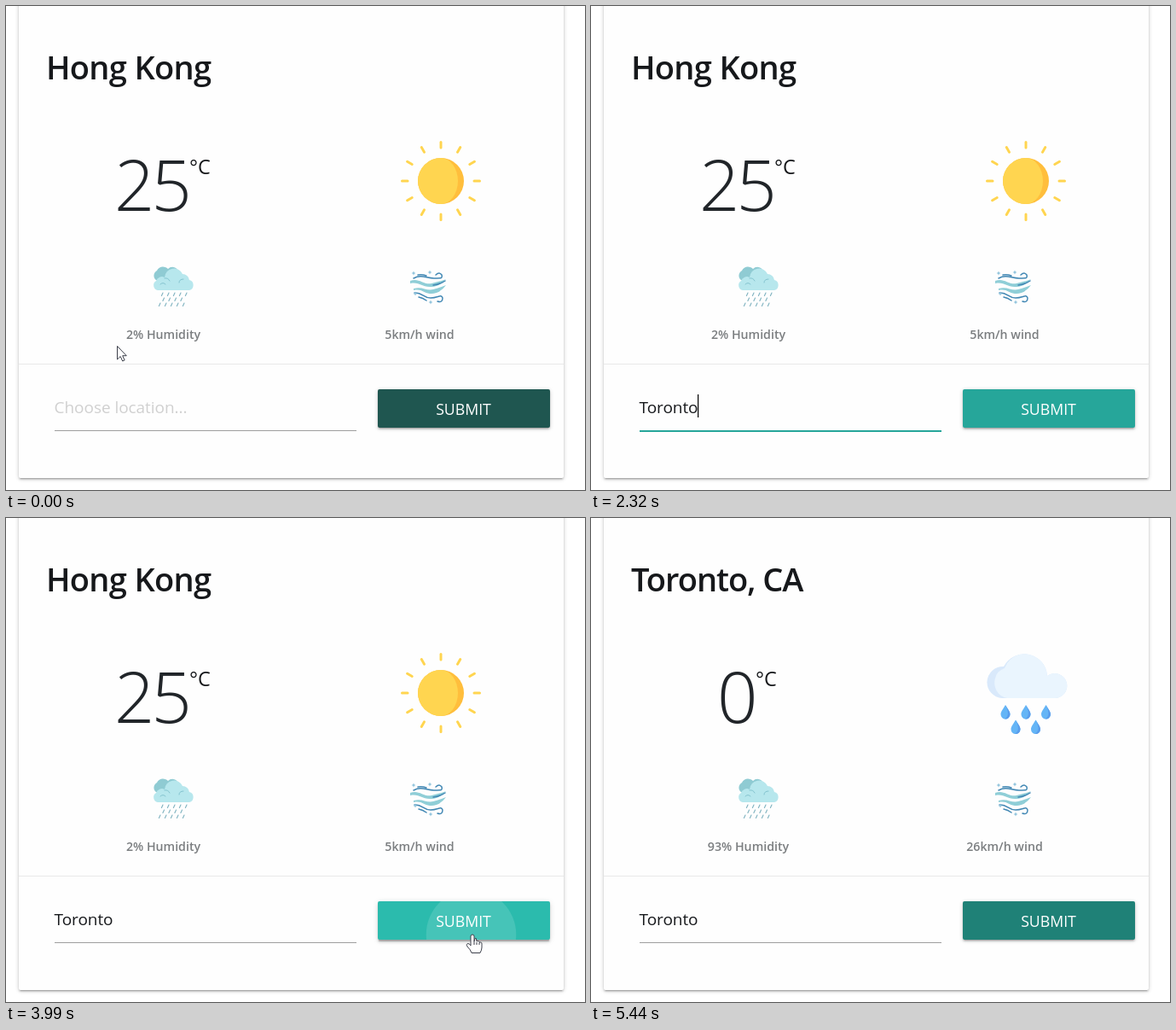
An HTML page for the animation above (5520 ms loop, 679 px wide and 567 px high).

```html
<!DOCTYPE html>
<html lang="en">
<head>
<meta charset="utf-8">
<title>Weather card</title>
<style>
  html, body { margin: 0; width: 100%; height: 100%; overflow: hidden; background: #fff; }
  div, svg { position: absolute; }
  #card { left: 15px; top: -20px; width: 639px; height: 573px; border-radius: 2px; background: #fefefe;
    box-shadow: 0 2px 2px rgba(0,0,0,.14), 0 3px 1px -2px rgba(0,0,0,.12), 0 1px 5px rgba(0,0,0,.2); }
  #button { left: 436px; top: 449px; width: 202px; height: 45px; border-radius: 2px; }
  svg { left: 0; top: 0; width: 679px; height: 567px; }
  text { font-family: "Open Sans", "Noto Sans", sans-serif; white-space: pre; }
  .title { font-size: 38px; font-weight: 560; fill: #16181b; }
  .temp { font-size: 83px; font-weight: 300; letter-spacing: -4px; fill: #212529; }
  .unit { font-size: 23.5px; font-weight: 500; fill: #16181b; }
  .label { font-size: 14.2px; font-weight: 600; fill: #7b7e80; text-anchor: middle; }
  .field { font-size: 19px; letter-spacing: -.05px; }
  .line { fill: none; stroke-linecap: round; stroke-linejoin: round; }
</style>
</head>
<body>
<div id="card"></div>
<div id="button"></div>
<svg viewBox="0 0 679 567">
  <defs>
    <clipPath id="buttonClip"><rect x="436" y="449" width="202" height="45" rx="2"/></clipPath>
    <clipPath id="cloudClip">
      <path d="M482 211A18.500 18.500 0 1 1 484 174A27 27 0 0 1 535 185A14.500 14.500 0 1 1 543 211Z"/>
    </clipPath>
    <g id="drop">
      <path fill="#64b5f6" d="M0-8C3-3 5.500 0 5.500 3A5.500 5.500 0 0 1-5.500 3C-5.500 0-3-3 0-8Z"/>
      <path fill="#5a9dec" d="M0-8C3-3 5.500 0 5.500 3A5.500 5.500 0 0 1-1 8.400C5 5 3-2 0-8Z"/>
    </g>
    <path id="spark" d="M0-2.500L.8-.8L2.500 0L.8.8L0 2.500L-.8.8L-2.500 0L-.8-.8Z"/>
  </defs>

  <g id="before">
    <text class="title" x="47" y="86" letter-spacing="-.7">Hong Kong</text>
    <text class="temp" x="127" y="240">25</text>
    <text class="unit" x="215" y="197">°C</text>
    <text class="label" x="184.500" y="390">2% Humidity</text>
    <text class="label" x="485" y="390">5km/h wind</text>
    <circle cx="510" cy="205" r="27" fill="#ffbe3c"/>
    <path fill="#ffd550" d="M510 178A27 27 0 0 0 510 232A20 27 0 0 0 510 178Z"/>
    <g id="rays" class="line" stroke="#ffd550" stroke-width="3"></g>
  </g>

  <g id="after">
    <text class="title" x="47" y="86" letter-spacing="-1">Toronto, CA</text>
    <text class="temp" x="148" y="240">0</text>
    <text class="unit" x="193" y="197">°C</text>
    <text class="label" x="184.500" y="390">93% Humidity</text>
    <text class="label" x="485" y="390">26km/h wind</text>
    <g clip-path="url(#cloudClip)">
      <rect x="460" y="155" width="100" height="60" fill="#d9e9fb"/>
      <path fill="#eaf5fe" d="M488 211A18 18 0 0 1 474 188Q476 179 485 176Q491 160 513 157L560 157V211Z"/>
    </g>
    <use href="#drop" x="486" y="227"/><use href="#drop" x="510" y="227"/><use href="#drop" x="533.500" y="227"/>
    <use href="#drop" x="498" y="244.500"/><use href="#drop" x="521.500" y="244.500"/>
  </g>

  <path fill="#8fcbd3" d="M176 321A6.500 6.500 0 0 1 177 310A8 8 0 0 1 190 308A7 7 0 0 1 202 314L196 324Z"/>
  <path fill="#b7e7ed" d="M178 333A6 6 0 0 1 176 322A7 7 0 0 1 186 318A11 11 0 0 1 207 314A8 8 0 0 1 215 321A6.200 6.200 0 0 1 215 333Z"/>
  <g class="line" stroke="#83c3cf">
    <path d="M186 319Q190 318 192 322M203 324Q203 320 208 320M181 326Q184 323 187 326"/>
    <path id="rain" stroke="#7fb3c0" stroke-width="1.100"/>
  </g>

  <path fill="#8fced7" d="M474 322C484 318 490 327 499 325Q508 323 516 320Q507 330 497 329C487 329 485 323 474 325ZM478 331C488 328 493 334 501 332Q509 330 516 327Q508 338 497 337C489 336 488 331 478 333Z"/>
  <g class="line" stroke="#4288b4" stroke-width="1.500">
    <path d="M478 319C487 314 493 319 502 319S512 319 511 315Q508 311 504 315M483 315Q488 314 493 316"/>
    <path d="M479 336C488 335 489 342 498 342S510 337 512 342Q512 348 506 346M484 341Q489 342 493 345M501 327Q509 326 515 322"/>
  </g>
  <g fill="#8fc3dc">
    <use href="#spark" x="478" y="313"/><use href="#spark" x="497" y="312"/>
    <use href="#spark" x="480" y="337"/><use href="#spark" x="498" y="347"/>
  </g>

  <path fill="#e9e9e9" d="M15 419H654V420H15Z"/>
  <text id="hint" class="field" x="56.500" y="477" fill="#d0d0d0">Choose location...</text>
  <text id="typed" class="field" x="56.500" y="477" fill="#16181b"></text>
  <rect id="caret" y="455" width="1.200" height="27"/>
  <rect id="underline" x="57" y="497" width="354"/>
  <circle id="ripple" cx="545.500" cy="488" fill="#fff" clip-path="url(#buttonClip)"/>
  <text x="536.500" y="479" font-size="17.700" font-weight="500" text-anchor="middle" fill="#fff">SUBMIT</text>

  <g id="cursor" fill="#fff" stroke="#3c3f4a" stroke-linejoin="round">
    <path id="arrow" d="M0 0V15.500L3.700 12L6.200 17.500L8.600 16.400L6.200 11.200H10.800Z"/>
    <path id="hand" d="M-2 13V2A2 2 0 0 1 2 2V8Q4 0 5 8Q8 6.500 8 9.500Q11 8 11 11V15Q11 18 9 21.500H-1Q-2 18-6 14Q-8 11-5 10.500Q-3 11-2 13M2 8V12M5 9V12M8 10V12"/>
  </g>
</svg>

<script>
const LOOP = 5520;
const $ = id => document.getElementById(id);
const show = (id, on) => { $(id).style.display = on ? '' : 'none'; };
const last = (rows, t) => rows.filter(row => row[0] <= t).pop();

// Rows are [time, ...values]; values blend linearly from row to row.
function blend(rows, t) {
  const next = rows.findIndex(row => row[0] > t);
  if (next === 0) return rows[0].slice(1);
  if (next < 0) return rows[rows.length - 1].slice(1);
  const a = rows[next - 1], b = rows[next], p = (t - a[0]) / (b[0] - a[0]);
  return a.slice(1).map((v, i) => v + (b[i + 1] - v) * p);
}

const buttonColor = [[60, 31, 86, 80], [390, 38, 166, 154], [3480, 38, 166, 154], [3700, 43, 187, 173],
  [4060, 43, 187, 173], [4380, 29, 154, 140], [4620, 31, 129, 119]];
const buttonLift = [[3480, 0], [3700, 1], [4400, 1], [4620, 0]];
const focus = [[600, 0], [780, 1], [3700, 1], [3960, 0]];
const rippleAlpha = [[3890, .13], [4080, .13], [4380, .2], [4620, 0]];
const keyTimes = [1450, 1690, 1860, 1930, 2080, 2250, 2320];
// [time, x, y, shape], each held until the next
const cursorPath = [
  [0, 130.5, 398.5, 'arrow'], [80, 129, 412, 'arrow'], [160, 126, 430, 'arrow'], [235],
  [2980, 230, 430, 'arrow'], [3060, 350, 385, 'arrow'], [3135, 480, 361, 'arrow'],
  [3210, 558.5, 436.5, 'arrow'], [3290, 609, 476, 'hand'], [3370, 596, 499, 'arrow'],
  [3450, 570, 500, 'arrow'], [3520, 556, 495, 'hand'], [3600, 547, 488, 'hand'],
  [4080, 560, 485, 'hand'], [4155, 612, 478, 'hand'], [4235, 666, 465, 'arrow'], [4310]
];

for (let i = 0; i < 12; i++)
  $('rays').innerHTML += `<path d="M510 159.500V166" transform="rotate(${i * 30} 510 205)"/>`;

let rain = '';
for (let row = 0; row < 3; row++)
  for (let i = 0; i < 5 - row % 2; i++)
    rain += `M${184 + i * 7 - row * 1.5 + row % 2 * 3} ${336 + row * 6}l-1.600 3.500`;
$('rain').setAttribute('d', rain);

function caretOn(t) {
  if (t < 640 || t >= 3760) return false;
  if (t < 1450) return t < 1120;
  return t < 2900 || t >= 3430;
}

function draw(t) {
  show('before', t < 4235);
  show('after', t >= 4235);

  const count = keyTimes.filter(time => time <= t).length;
  $('typed').textContent = 'Toronto'.slice(0, count);
  show('hint', !count);
  show('caret', caretOn(t));
  $('caret').setAttribute('x', 57 + (count ? $('typed').getComputedTextLength() - 1 : 0));

  const [f] = blend(focus, t);
  $('underline').setAttribute('height', 1 + f);
  $('underline').setAttribute('fill', `rgb(${158 - 120 * f},${158 + 8 * f},${158 - 4 * f})`);

  const [lift] = blend(buttonLift, t);
  $('button').style.background = `rgb(${blend(buttonColor, t)})`;
  $('button').style.boxShadow = `0 ${2 + lift}px ${2 + lift}px rgba(0,0,0,.14),` +
    `0 ${3 - 2 * lift}px ${1 + 6 * lift}px ${-2 + 2 * lift}px rgba(0,0,0,.12),` +
    `0 ${1 + 2 * lift}px ${5 - 4 * lift}px ${-lift}px rgba(0,0,0,.2)`;

  const p = Math.min(1, Math.max(0, (t - 3890) / 750));
  $('ripple').setAttribute('r', 210 * (1 - (1 - p) ** 2));
  $('ripple').setAttribute('opacity', blend(rippleAlpha, t)[0]);

  const [, x, y, shape] = last(cursorPath, t);
  show('arrow', shape === 'arrow');
  show('hand', shape === 'hand');
  if (shape) $('cursor').setAttribute('transform', `translate(${x} ${y})`);
}

function tick() {
  draw(performance.now() % LOOP);
  requestAnimationFrame(tick);
}
tick();
</script>
</body>
</html>
```
